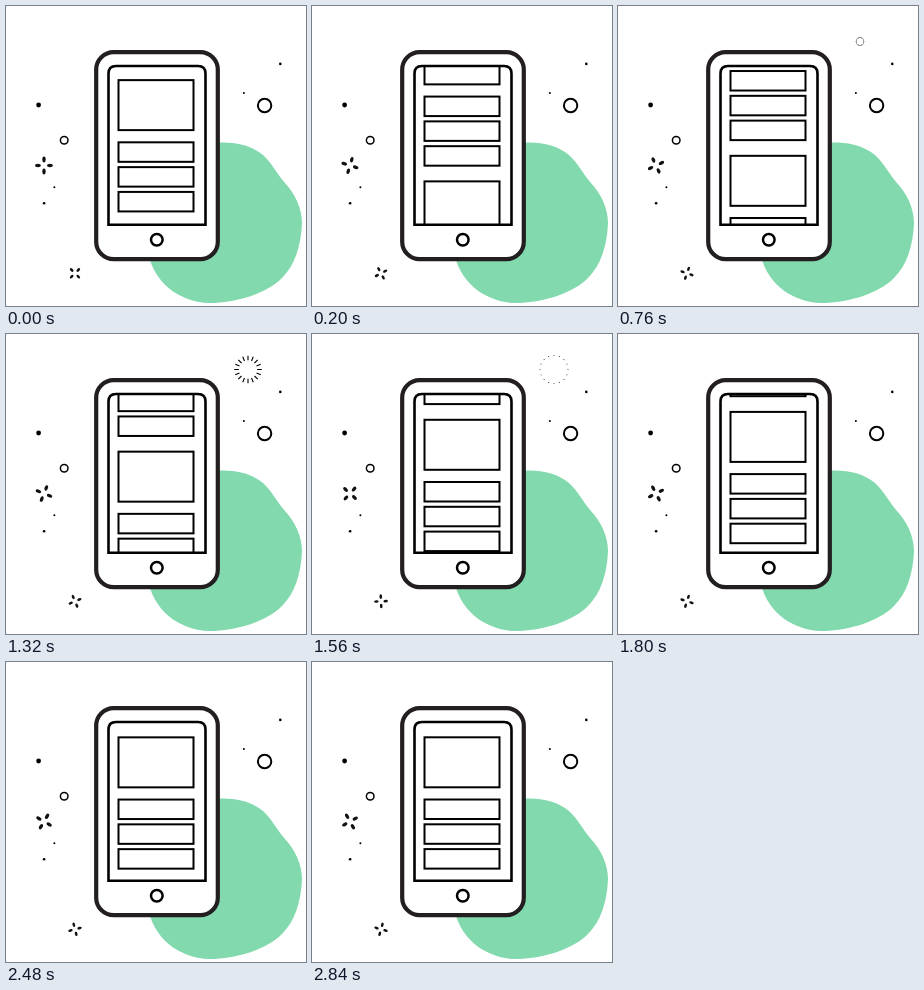
Animation of 300 by 300 pixels, one loop 2880 ms. Source, as an HTML page:

```html
<!DOCTYPE html>
<html lang="en">
<head>
<meta charset="utf-8">
<title>Scrolling phone</title>
<style>
  html, body { margin: 0; width: 100%; height: 100%; overflow: hidden; background: #fff; }
  svg { display: block; width: 100vw; height: 100vh; }
</style>
</head>
<body>
<svg viewBox="0 0 300 300" fill="none" stroke="#000">
  <defs>
    <clipPath id="screen"><rect x="103" y="61" width="96" height="157"/></clipPath>
    <ellipse id="petal" cx="0" cy="-6" rx="1.7" ry="2.9" fill="#111" stroke="none"/>
    <g id="spark">
      <use href="#petal"/>
      <use href="#petal" transform="rotate(90)"/>
      <use href="#petal" transform="rotate(180)"/>
      <use href="#petal" transform="rotate(270)"/>
    </g>
    <g id="cards" stroke-width="2">
      <rect x="112.5" y="75.3" width="75" height="50"/>
      <rect x="112.5" y="137.5" width="75" height="19.5"/>
      <rect x="112.5" y="162.3" width="75" height="19.5"/>
      <rect x="112.5" y="187.1" width="75" height="19.5"/>
    </g>
  </defs>

  <path fill="#82d9ae" stroke="none" d="M213 136.5C232 136 246 140 257 149C266 157 271 168 279 177C289 188 296 202 296 217C295 240 289 259 276 272C261 287 231 297 203 297C176 296 152 280 144 254L180 160Z"/>
  <rect x="90.2" y="46.2" width="121.6" height="207" rx="17.5" fill="#fff" stroke="#231f20" stroke-width="4.2"/>
  <path d="M102.5 218.8V67.5Q102.5 60 110 60H192Q199.500 60 199.500 67.5V218.8Z" stroke-width="2.6"/>
  <circle cx="150.800" cy="233.800" r="5.800" stroke-width="2.5"/>

  <g clip-path="url(#screen)">
    <g id="feed">
      <use href="#cards"/>
      <use href="#cards" y="147"/>
      <use href="#cards" y="294"/>
    </g>
  </g>

  <circle cx="258.600" cy="99.500" r="6.700" stroke-width="2"/>
  <circle cx="58.200" cy="134.200" r="3.800" stroke-width="1.500"/>
  <g fill="#000" stroke="none">
    <circle cx="32.600" cy="99" r="2.400"/>
    <circle cx="274.300" cy="57.900" r="1.300"/>
    <circle cx="237.900" cy="87" r="1"/>
    <circle cx="48.400" cy="181.200" r="1"/>
    <circle cx="38.100" cy="197.300" r="1.300"/>
  </g>

  <use id="bigSpark" href="#spark"/>
  <use id="smallSpark" href="#spark"/>
  <path id="burst" stroke-width="1.100"/>
</svg>
<script>
  const LOOP = 2880, STEP = 40, SWIPE = 73.5;
  const byId = id => document.getElementById(id);
  const clamp = x => Math.min(1, Math.max(0, x));
  const smooth = x => x * x * (3 - 2 * x);

  // Short acceleration followed by an exponential glide.
  const RAMP = 90, GLIDE = 172, LEFT = 1 / (1 + RAMP / (2 * GLIDE));
  function swipe(ms) {
    if (ms <= 0) return 0;
    if (ms < RAMP) return (1 - LEFT) * (ms / RAMP) ** 2;
    return 1 - LEFT * Math.exp((RAMP - ms) / GLIDE);
  }

  const RAYS = 16;
  function burstPath(t) {
    if (t < 720 || t >= 1640) return "";
    const outer = 4 + 10.3 * smooth(clamp((t - 700) / 720));
    const inner = 3.6 + 10.7 * smooth(clamp((t - 960) / 700));
    let d = "";
    for (let i = 0; i < RAYS; i++) {
      const a = i * 2 * Math.PI / RAYS;
      const at = r => `${242 + r * Math.sin(a)} ${35.500 - r * Math.cos(a)}`;
      d += `M${at(inner)}L${at(outer)}`;
    }
    return d;
  }

  function draw(t) {
    const scroll = SWIPE * (swipe(t + 25) + swipe(t - 1175));
    byId("feed").setAttribute("transform", `translate(0 ${-scroll})`);
    const turn = t * 180 / 2120;
    byId("bigSpark").setAttribute("transform", `translate(38 159.500) rotate(${turn})`);
    byId("smallSpark").setAttribute("transform", `translate(69 267.300) rotate(${turn + 45}) scale(.78)`);
    byId("burst").setAttribute("d", burstPath(t));
  }

  const start = performance.now();
  function tick() {
    const t = (performance.now() - start) % LOOP;
    draw(Math.floor(t / STEP) * STEP);
    requestAnimationFrame(tick);
  }
  draw(0);
  requestAnimationFrame(tick);
</script>
</body>
</html>
```
